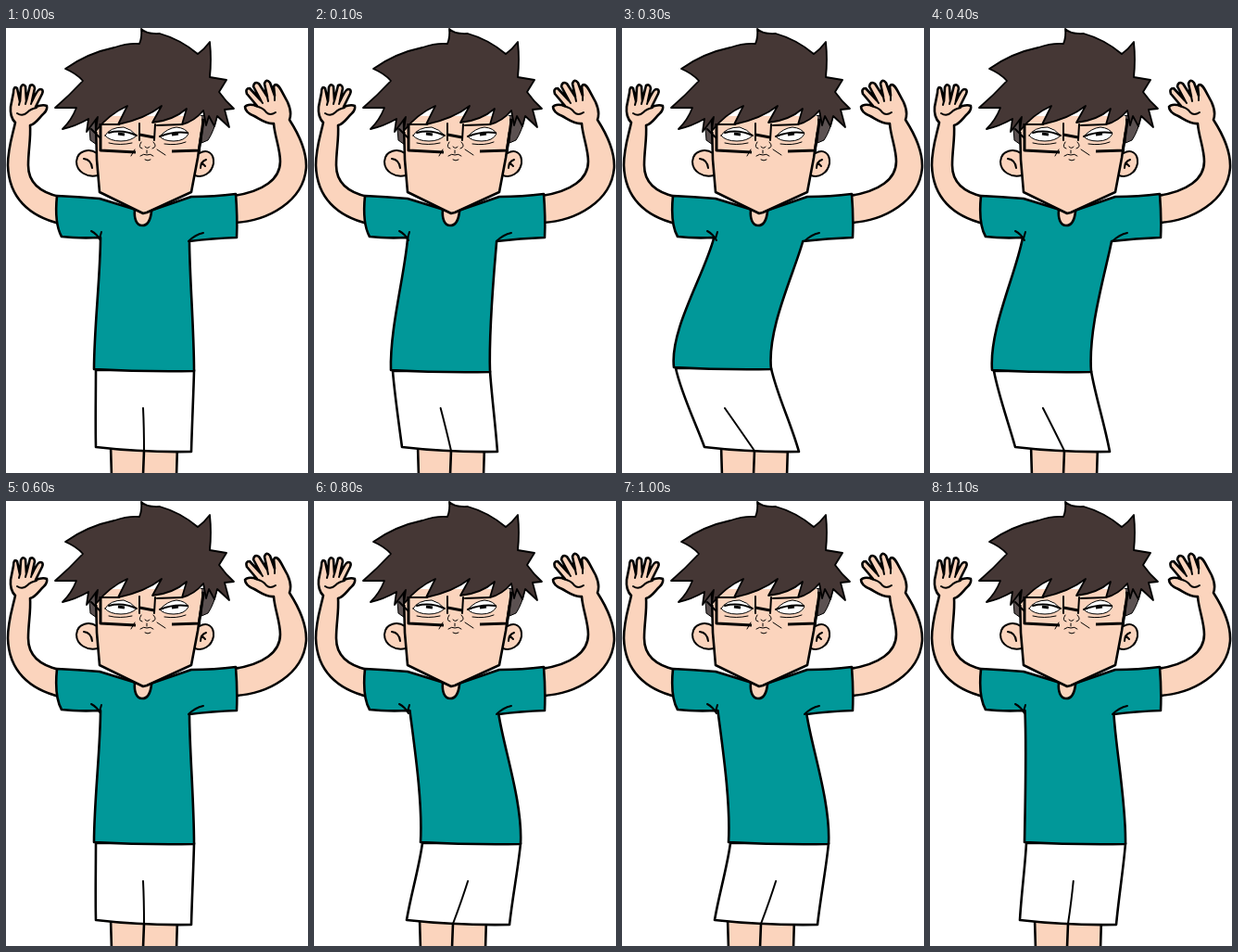
Write an HTML page that moves like this. It is 326 px wide and 480 px high and loops after 1200 ms.

```html
<!DOCTYPE html>
<html lang="en">
<head>
<meta charset="utf-8">
<title>Swaying dancer</title>
<style>
  html, body { margin: 0; width: 100%; height: 100%; overflow: hidden; background: #fff; }
  svg { display: block; width: 100vw; height: 100vh; }
  path { stroke: #000; stroke-width: 2.6; stroke-linecap: round; stroke-linejoin: round; fill: none; }
  .skin { fill: #fbd4bd; }
  .teal { fill: #019899; }
  .white { fill: #fff; }
  .hair { fill: #453735; stroke-width: 1.8; }
  .side { fill: #5b5151; stroke-width: 1; }
  .thin { stroke-width: 1; }
  .mid { stroke-width: 2; }
  .bold { stroke-width: 3; stroke-linecap: butt; }
  .flat { stroke: none; }
</style>
</head>
<body>
<svg viewBox="0 0 326 480" preserveAspectRatio="none">
  <!-- lower body, redrawn for every pose -->
  <path id="legs" class="skin"/>
  <path id="split"/>
  <path id="shorts" class="white"/>
  <path id="fly" class="mid"/>

  <!-- arms -->
  <path class="skin" d="M58 182C35 177 24 165 24 148C24 132 27 119 26 105C33 103 36 96 41 92Q45 88 44 84Q40 82 32 85L39 71Q41 66 37 66Q34 66 28 79L31 65Q30 60 26 62L22 78L21 63Q18 59 16 64L15 79L12 65Q8 62 8 70L5 85Q4 96 10 102C7 116 2 129 2 148C3 183 25 203 58 211"/>
  <path class="mid" d="M12 92Q18 96 23 91Q27 87 33 86M15 79L14 83M22 78L21 82M28 79L27 82"/>
  <path class="skin" d="M246 181C278 176 296 163 296 144C296 130 290 117 289 103C281 104 274 98 268 95Q258 91 258 85Q261 81 271 84L260 71Q258 65 263 65L275 78L267 63Q268 57 273 60L282 74L279 60Q281 54 285 59L290 73L289 63Q292 58 297 67L304 80Q309 91 306 99C315 113 325 132 324 151C321 187 283 208 247 210"/>
  <path class="mid" d="M269 84Q278 86 281 91Q285 95 291 91M275 78L277 81M282 74L283 79M290 73L290 78"/>

  <path id="shirt" class="teal"/>
  <path class="mid" d="M92 219Q98 222 102 229M103 220L101 227M213 221Q204 223 197 230"/>

  <!-- neck, ears, face -->
  <path class="skin" d="M139 196C138 206 141 213 147 213C153 213 156 207 157 198"/>
  <path class="skin mid" d="M98 135C91 130 77 131 76 144C76 155 88 162 99 159"/>
  <path class="skin mid" d="M209 135C217 130 225 135 224 146C222 157 212 162 204 159"/>
  <path class="mid" d="M84 141Q92 142 93 151M216 142Q210 144 210 151M212 146L215 149"/>
  <path class="side" d="M89 96L91 121L98 126L102 96ZM210 95L211 124L218 121Q225 111 228 94Z"/>
  <path class="skin" d="M97 100L98 142L101 177L148 200L152 199L200 177L207 140L213 99Z"/>
  <path class="flat skin" d="M98 95H211V112H98Z"/>

  <!-- eyes, nose, mouth -->
  <path class="white thin" d="M107 116Q112 107 127 107Q135 109 141 116Q135 122 124 122Q112 122 107 116Z"/>
  <path class="white thin" d="M166 117Q174 108 184 107Q194 108 197 114Q193 122 181 122Q170 122 166 117Z"/>
  <path class="mid" d="M111 113Q126 109 141 116M166 117Q181 111 196 113"/>
  <path class="bold" d="M121 114L128 115M179 115L186 114"/>
  <path class="thin" d="M111 124Q123 127 136 124M171 125Q184 127 194 123M146 123Q142 129 147 130M150 128Q153 131 155 128M159 123Q164 128 158 130M139 131L135 138M163 131L172 137M152 132V135M145 138Q149 135 152 137Q156 135 159 138M150 142Q153 144 156 142"/>

  <path class="hair" d="M146 1Q152 7 166 6Q188 12 207 28Q214 23 220 15Q222 34 220 53L238 56L230 69Q237 79 246 87L236 88L241 107L228 95L225 106L219 95L216 105L213 89Q203 101 190 104L195 87Q180 100 158 102L168 84Q150 98 121 104L131 84Q111 93 97 111L99 96L87 112L89 98Q75 106 61 109Q71 99 76 86L53 86Q68 73 83 57Q76 49 64 44Q88 27 117 21Q131 16 144 17Q147 10 146 1Z"/>

  <!-- glasses -->
  <path class="bold" d="M102 103L102 132L140 134M144 115L160 118M179 133L210 132M213 100L208 134"/>
  <path class="mid" d="M102 104L122 104M92 109L102 119M144 103L144 121M161 104L160 121M163 105L190 104"/>
</svg>
<script>
  // [hem left, hem right, hem y, shorts left, shorts right, leg left]
  const poses = {
    l3: [56, 161, 367, 89, 191, 107],
    l2: [67, 174, 370, 92, 194, 109],
    l1: [83, 190, 370, 95, 198, 112],
    c:  [95, 203, 369, 97, 200, 113],
    r1: [102, 211, 369, 97, 201, 113],
    r2: [115, 223, 369, 100, 211, 114],
    r3: [130, 237, 366, 103, 206, 117]
  };
  const order = ["c", "l1", "l2", "l3", "l2", "l1", "c", "r1", "r2", "r3", "r2", "r1"];
  const STEP = 100;

  const setPath = (id, d) => document.getElementById(id).setAttribute("d", d);
  const mix = (a, b, t) => a + (b - a) * t;

  function drawPose([hl, hr, hy, bl, br, leg]) {
    const lean = hl - 95;
    const sl = 102 + lean * 0.07;
    const sr = 198 + lean * 0.07;
    const bend = lean * 0.25;
    const bulge = lean * 0.12;
    const mid = (hl + hr) / 2;
    const fork = leg + 36;

    setPath("legs", `M${leg} 450L${leg + 1} 484H${leg + 71}L${leg + 72} 450`);
    setPath("split", `M${fork} 456L${fork - 1} 482`);
    setPath("shorts", `M${hl + 2} ${hy}C${mix(hl + 2, bl, 0.2)} 395 ${mix(hl, bl, 0.7)} 425 ${bl} 452
      Q${(bl + br) / 2} 458 ${br} 457C${mix(hr, br, 0.7)} 425 ${mix(hr, br, 0.2)} 395 ${hr} ${hy}Z`);
    setPath("fly", `M${mix(mid, fork, 0.1) - 1} 410Q${mix(mid, fork, 0.5)} 431 ${fork} 456`);
    setPath("shirt", `M55 181Q77 182 101 184L150 199L200 182Q225 182 248 179
      Q250 204 249 226Q222 227 ${sr} 230
      C${sr + bend} 265 ${hr + bulge} 325 ${hr} ${hy + 1}
      Q${mid} ${hy + 2} ${hl} ${hy - 1}
      C${hl + bulge} 325 ${sl + bend} 265 ${sl} 226
      Q77 227 60 225Q52 211 55 181Z`);
  }

  let shown = "";
  function tick() {
    const name = order[Math.floor(performance.now() / STEP) % order.length];
    if (name !== shown) drawPose(poses[shown = name]);
    requestAnimationFrame(tick);
  }
  tick();
</script>
</body>
</html>
```
